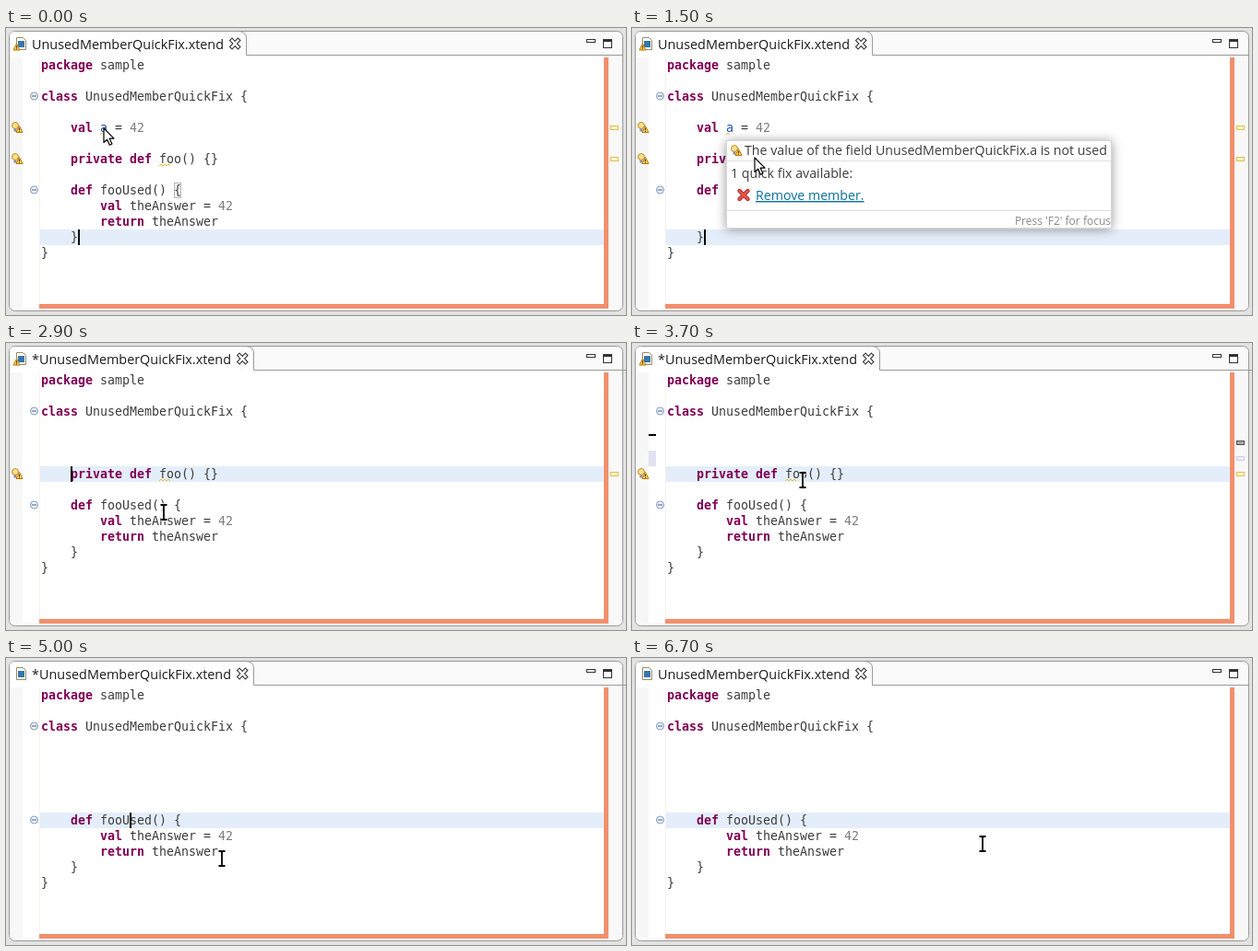
Animation, 672 px wide and 312 px high, one loop 7.3 s. Source, as an HTML page:

```html
<!DOCTYPE html>
<html lang="en">
<head>
<meta charset="utf-8">
<title>Unused member quick fix</title>
<style>
  html, body { margin: 0; width: 100%; height: 100%; overflow: hidden; background: #e3e3e3; }
  svg { display: block; }
  text { white-space: pre; fill: #3c3c3c; }
  .code { font: 13.29px "DejaVu Sans Mono", monospace; }
  .keyword { font-weight: bold; fill: #7f0055; }
  .number { fill: #7d7d7d; }
  .field { fill: #2450b0; }
  .ui { font: 14.2px "Open Sans", sans-serif; }
  .tab { font-size: 14.4px; fill: #1c1c1c; }
  .link { fill: #0a709c; text-decoration: underline; }
  .hint { font-size: 12px; fill: #8a8a8a; }
  .wave { fill: none; stroke: #efbd3c; }
  .popup { filter: drop-shadow(0 1px 6px rgba(0, 0, 0, .4)); }
</style>
</head>
<body>
<svg id="stage" width="672" height="312" viewBox="0 0 672 312" xmlns="http://www.w3.org/2000/svg"></svg>
<script>
const LOOP = 7300;
const rowTop = row => 32 + 17 * row;
const colX = col => 38 + 8 * col;
const rect = (x, y, w, h, fill, more = '') =>
  `<rect x="${x}" y="${y}" width="${w}" height="${h}" fill="${fill}" ${more}/>`;
const path = (d, more) => `<path d="${d}" ${more}/>`;
const group = (id, ...parts) => `<g id="${id}">${parts.join('')}</g>`;
const ui = (x, y, text, cls = '', more = '') =>
  `<text x="${x}" y="${y}" class="ui ${cls}" ${more}>${text}</text>`;

function codeLine(row, source) {
  const html = source
    .replace(/\b(package|class|val|private|def|return)\b|\b(\d+)\b|\b(a)\b/g, (word, keyword, number) =>
      `<tspan §${keyword ? 'keyword' : number ? 'number' : 'field'}§>${word}</tspan>`)
    .replace(/§(\w+)§/g, 'class="$1"');
  return `<text class="code" xml:space="preserve" x="38" y="${rowTop(row) + 13}">${html}</text>`;
}

function wave(row, col, chars) {
  let d = `M${colX(col)} ${rowTop(row) + 16}`;
  for (let i = 0; i < chars * 2; i++) d += `l2 ${i % 2 ? 2 : -2}`;
  return path(d, 'class="wave"');
}

const triangle = (x, y) =>
  path(`M${x} ${y}l3.5 7h-7z`, 'fill="#ffd34d" stroke="#b9770e" stroke-linejoin="round"') +
  rect(x - .5, y + 2.3, 1, 2.4, '#4a3000') + rect(x - .5, y + 5.3, 1, 1, '#4a3000');

const bulb = (x, y) => `<g transform="translate(${x} ${y})">
  <circle cx="4" cy="4" r="3.5" fill="#fbe08a" stroke="#c08a2c"/>
  ${rect(2.5, 7.5, 3, 3, '#8c8c9c')}${triangle(8.5, 4.5)}</g>`;

const fold = row => `<g transform="translate(30.5 ${rowTop(row) + 8})" stroke="#8099b8">
  <circle r="4" fill="#edf3fa"/><path d="M-2.5 0h5" stroke="#41618a"/></g>`;

const rulerMark = (row, fill, stroke) =>
  rect(655.5, rowTop(row) + 6.5, 8, 4, fill, `stroke="${stroke}"`);
const warning = row => bulb(6, rowTop(row) + 2) + rulerMark(row, '#fff3c4', '#e3bd58');

const changedLines = rows => rows.map(row =>
  rect(18, rowTop(row), 8, 17, '#e3e2f2') + rulerMark(row, '#ececf8', '#cfcfe6')).join('');
const quickDiff = rows =>
  rect(18, 99, 8, 2, '#000') + rulerMark(4, '#a8a8a8', '#555') + changedLines(rows);

const popup = (id, x, y, width, message) => `<g id="${id}">
  ${rect(x + .5, y + .5, width, 95, '#fff', 'stroke="#d6d6d6" class="popup"')}
  ${rect(x + 1, y + 22, width - 1, 1, '#dedede')}${rect(x + 1, y + 76, width - 1, 1, '#dedede')}
  ${bulb(x + 5, y + 5)}
  ${ui(x + 20, y + 16, message)}
  ${ui(x + 5, y + 41, '1 quick fix available:')}
  ${path(`M${x + 14.5} ${y + 55}l9 9m0 -9l-9 9`, 'stroke="#b52a22" stroke-width="4.4" stroke-linecap="round"')}
  ${path(`M${x + 14.5} ${y + 55}l9 9m0 -9l-9 9`, 'stroke="#e8574b" stroke-width="2.4" stroke-linecap="round"')}
  ${ui(x + 32, y + 65, 'Remove member.', 'link')}
  ${ui(x + width, y + 92, "Press 'F2' for focus", 'hint', 'text-anchor="end"')}</g>`;

const closeCross = 'M245 13.5l6.5 7m0 -7l-6.5 7';
const beam = 'M-3.5 -8h2.5l1 1l1 -1h2.5M0 -7v14M-3.5 8h2.5l1 -1l1 1h2.5';
const outline = 'fill="#fff" stroke="#000" stroke-width="1.2" stroke-linejoin="round"';

stage.innerHTML = [
  // window, tab bar and rulers
  rect(3.5, 3.5, 665, 304, '#fafafa', 'rx="6" stroke="#999"'),
  rect(4, 30, 664, 274, '#fff'),
  rect(4, 32, 14, 272, '#f7f7f7'),
  rect(653, 32, 15, 272, '#f8f8f8'),
  rect(36, 32, 1, 273, '#fbefec'),
  path('M4 30V9.500Q4 4 9.500 4H254V30Z', 'fill="#fff"'),
  group('tabEnd',
    path('M250 4H253Q260.500 4 260.500 11V30H250Z', 'fill="#fff"'),
    path('M252 3.500Q260.500 4 260.500 11V29.500H668', 'fill="none" stroke="#999"'),
    path(closeCross, 'stroke="#333" stroke-width="4.6" stroke-linecap="square"'),
    path(closeCross, 'stroke="#fff" stroke-width="2.4" stroke-linecap="square"'),
    ui(28, 22.5, 'UnusedMemberQuickFix.xtend', 'tab')),
  ui(28, 22.5, '*', 'tab', 'id="star"'),
  path('M11.500 10.500h7l3 3v10h-10z', 'fill="#fff" stroke="#9a8a62"'),
  rect(13, 14, 7, 7, '#3478ad'),
  group('tabWarning', triangle(11.5, 17)),
  rect(629.5, 12.5, 9, 3, '#fff', 'stroke="#333"'),
  rect(647.5, 12.5, 9, 9, '#fff', 'stroke="#333"'), rect(647, 12, 10, 3, '#333'),

  // editor
  rect(37, 0, 612, 17, '#e4eefa', 'id="activeLine"'),
  group('flash', rect(648, 32, 5, 273, '#f28f6d'), rect(36, 300, 612, 5, '#f28f6d')),
  codeLine(0, 'package sample'),
  codeLine(2, 'class UnusedMemberQuickFix {'),
  group('fieldLine', codeLine(4, '    val a = 42'), wave(4, 8, 1), warning(4),
    rect(182.5, 168.5, 7, 16, 'none', 'stroke="#b5b5b5"')),
  group('methodLine', codeLine(6, '    private def foo() {}'), wave(6, 16, 3), warning(6)),
  codeLine(8, '    def fooUsed() {'),
  codeLine(9, '        val theAnswer = 42'),
  codeLine(10, '        return theAnswer'),
  codeLine(11, '    }'),
  codeLine(12, '}'),
  fold(2), fold(8),
  group('firstDiff', quickDiff([5])),
  group('secondDiff', quickDiff([5, 6])),
  rect(0, 0, 2, 17, '#000', 'id="caret"'),
  popup('fieldPopup', 102, 122, 417, 'The value of the field UnusedMemberQuickFix.a is not used'),
  popup('methodPopup', 166, 156, 544, 'The method foo() from the type UnusedMemberQuickFix is never used locally'),

  // pointers, each with its hot spot at 0,0
  group('arrow', path('M0 0V15.500L3.600 12.200L6.300 18.200L8.900 17L6.200 11.200H11Z', outline)),
  group('beam',
    path(beam, 'fill="none" stroke="#fff" stroke-width="3.6"'),
    path(beam, 'fill="none" stroke="#000" stroke-width="1.8"')),
  group('hand',
    path('M-2 9V1.500Q-2 0 -.500 0Q1 0 1 1.500V6Q4 5 4.500 7Q7 6 7.500 8Q10 7.500 10 10V12L8 17H-.500L-4.500 11.500Q-5 9 -3.500 9Z', outline),
    path('M1 6v4M4.500 7v3M7.500 8v2', 'stroke="#000"'))
].join('');

// Latest value whose start time has been reached.
const valueAt = (t, steps) => steps.findLast(([start]) => start <= t)[1];
const $ = id => document.getElementById(id);
const show = (id, on) => $(id).setAttribute('display', on ? 'inline' : 'none');
const move = (id, x, y) => $(id).setAttribute('transform', `translate(${x} ${y})`);

const caretPlaces = [[0, [11, 5]], [2500, [6, 4]], [5000, [8, 12]]];
const caretBlink = [[0, 1], [100, 0], [900, 1], [1800, 0], [2500, 1], [3600, 0], [4500, 1],
  [5700, 0], [6200, 1], [6600, 0]];
const pointerSteps = [
  [0, ['arrow', 106, 109]], [100, ['beam', 108, 111]],
  [1400, ['arrow', 120, 126]], [1500, ['arrow', 133, 141]], [1600, ['arrow', 150, 161]],
  [1700, ['arrow', 163, 175]], [1800, ['hand', 167, 179]], [2000, ['hand', 169, 179]],
  [2200, ['beam', 171, 184]], [3200, ['beam', 175, 172]], [3300, ['beam', 180, 158]],
  [3400, ['beam', 183, 150]], [3600, ['beam', 185, 149]],
  [4200, ['arrow', 198, 170]], [4300, ['arrow', 224, 194]], [4500, ['hand', 231, 211]],
  [4600, ['hand', 232, 215]], [4800, ['beam', 234, 218]], [6200, ['beam', 380, 202]]
];

function draw(t) {
  const tick = Math.floor(t / 100);
  $('flash').setAttribute('opacity', tick <= 8 ? 1 - tick / 8 : Math.min(1, (tick - 8) / 7));

  const [row, col] = valueAt(t, caretPlaces);
  move('activeLine', 0, rowTop(row));
  move('caret', colX(col), rowTop(row));
  show('caret', valueAt(t, caretBlink));

  const unsaved = t >= 2500 && t < 6200;
  show('star', unsaved);
  move('tabEnd', unsaved ? 8 : 0, 0);
  show('tabWarning', t < 5000);
  show('fieldLine', t < 2500);
  show('methodLine', t < 5000);
  show('firstDiff', t >= 3000 && t < 5000);
  show('secondDiff', t >= 5300 && t < 6600);
  show('fieldPopup', t >= 1100 && t < 2200);
  show('methodPopup', t >= 3900 && t < 4800);

  const [shape, x, y] = valueAt(t, pointerSteps);
  for (const id of ['arrow', 'beam', 'hand']) show(id, id === shape);
  move(shape, x, y);
}

function frame() {
  draw(performance.now() % LOOP);
  requestAnimationFrame(frame);
}
frame();
</script>
</body>
</html>
```
